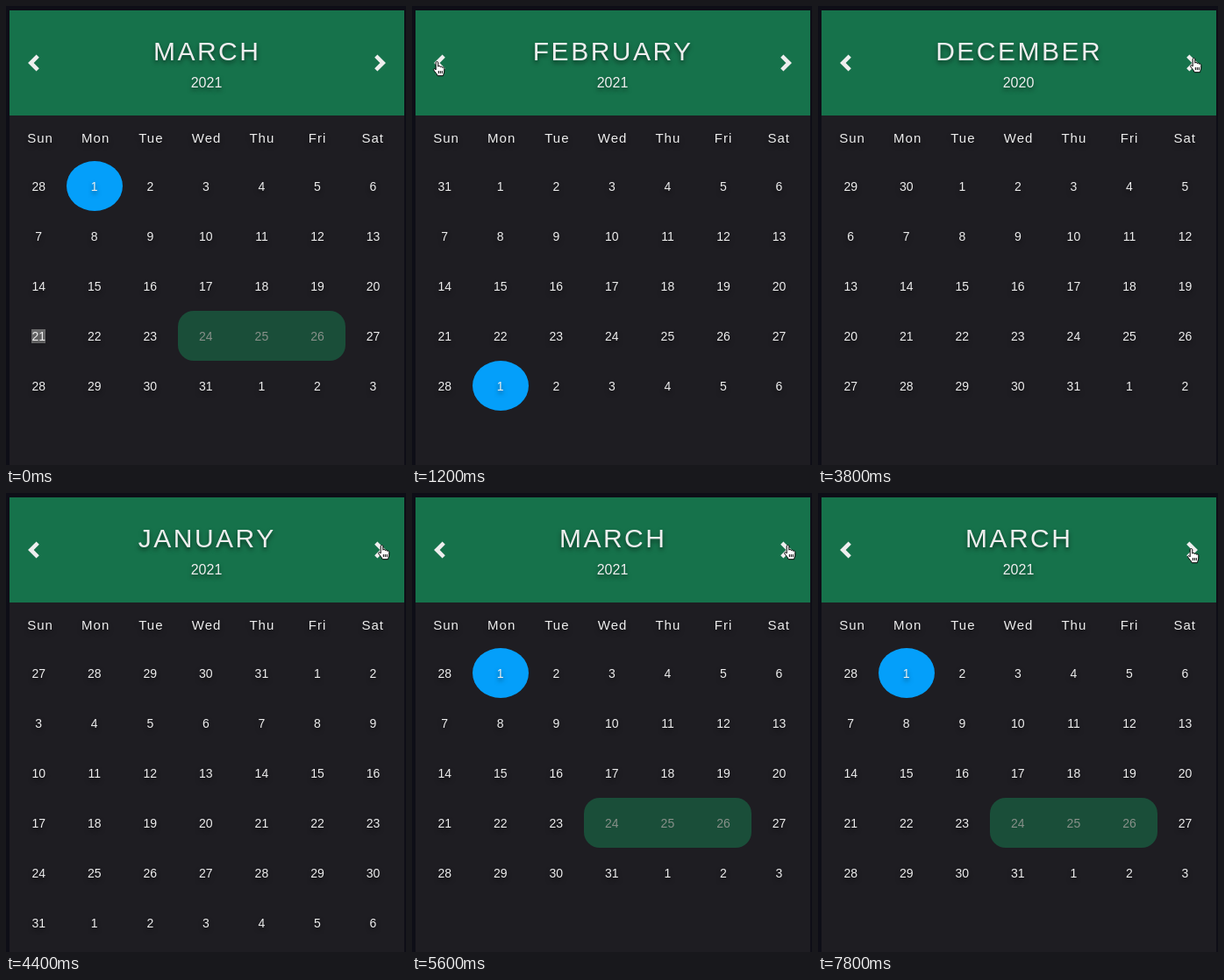
Animation of 456x524 px, one loop 8 s. Source, as an HTML page with a canvas:

```html
<!DOCTYPE html>
<html lang="en">
<head>
<meta charset="utf-8">
<title>Calendar</title>
<style>
  html, body { margin: 0; width: 100%; height: 100%; overflow: hidden; background: #0e0e17; }
  canvas { display: block; }
</style>
</head>
<body>
<canvas id="stage" width="456" height="524"></canvas>
<script>
const ctx = document.getElementById('stage').getContext('2d');
const LOOP = 8000, STEP = 200;
const FONT = '"Liberation Sans", Arial, sans-serif';
const WEEKDAYS = ['Sun', 'Mon', 'Tue', 'Wed', 'Thu', 'Fri', 'Sat'];
const MONTHS = ['January', 'February', 'March', 'April', 'May', 'June', 'July',
  'August', 'September', 'October', 'November', 'December'];

// [time, month offset from January 2021]
const PAGES = [[0, 2], [1200, 1], [1800, 0], [2400, -1], [4000, 0], [4600, 1], [5600, 2]];

// Each visit of the pointer: [time, x, y]
const VISITS = [
  [[200, 150, 150], [800, 24, 63], [2400, 24, 63], [3400, 404, 66],
   [3600, 435, 60], [3800, 424, 59], [5600, 424, 59], [5800, 443, 74]],
  [[7200, 400, 17], [7800, 421, 63], [8000, 421, 63]]
];

const HAND = new Path2D('M3.2 1.8C3.2.1 5.8.1 5.8 1.8V6.2C6.2 5 8.2 5.2 8.3 6.6C8.9 5.7 10.5 6 10.6 7.3' +
  'C11.3 6.6 12.8 7.1 12.8 8.5V11C12.8 14 11.5 14.8 11.5 16.7H5.2C4.6 14.3 1.8 12.4.8 10.2C.1 8.5 2 8 3.2 9.8Z');
const CREASES = new Path2D('M6.3 11V14M8.3 11V14M10.3 11V14');
const ARROW = new Path2D('M1 1V14L4 11.2L6 16L8.3 15L6.3 10.4H10.4Z');

function text(str, x, y, size, { spacing = 0, color = '#eee', shadow = true } = {}) {
  ctx.save();
  ctx.font = `${size}px ${FONT}`;
  ctx.letterSpacing = spacing + 'px';
  ctx.textAlign = 'center';
  ctx.fillStyle = color;
  if (shadow) {
    ctx.shadowColor = 'rgba(0,0,0,.5)';
    ctx.shadowOffsetY = 3;
    ctx.shadowBlur = 5;
  }
  ctx.fillText(str, x, y);
  ctx.restore();
}

function rect(x, y, w, h, color, radius = 0) {
  ctx.fillStyle = color;
  ctx.beginPath();
  ctx.roundRect(x, y, w, h, radius);
  ctx.fill();
}

function chevron(tip, end) {
  ctx.strokeStyle = '#eee';
  ctx.lineWidth = 4.6;
  ctx.beginPath();
  ctx.moveTo(end, 57.1);
  ctx.lineTo(tip, 65);
  ctx.lineTo(end, 72.9);
  ctx.stroke();
}

function drawHeader(date, sunSelected) {
  rect(4, 5, 450, 120, '#16724b');
  chevron(28.3, 36.2);
  chevron(429.7, 421.8);
  text(MONTHS[date.getMonth()].toUpperCase(), 229.2, 62, 30, { spacing: 2.5 });
  text(date.getFullYear(), 228.5, 93, 16);
  if (sunSelected) rect(24, 142, 30, 17, '#496f96');
  WEEKDAYS.forEach((day, i) => text(day, 39 + 63.2 * i, 156, 15, { spacing: 1 }));
}

function drawDays(first, daySelected) {
  const year = first.getFullYear(), month = first.getMonth(), lead = first.getDay();
  const length = new Date(year, month + 1, 0).getDate();
  const cells = Math.ceil((lead + length) / 7) * 7;
  for (let i = 0; i < cells; i++) {
    const date = new Date(year, month, 1 - lead + i);
    const day = date.getDate(), inMarch = date.getMonth() === 2;
    const x = 37.2 + 63.55 * (i % 7), y = 206 + 57 * Math.floor(i / 7);
    const booked = inMarch && day >= 24 && day <= 26;
    if (inMarch && day === 1) {
      ctx.fillStyle = '#049ffa';
      ctx.beginPath();
      ctx.ellipse(101, y - .5, 32, 28.5, 0, 0, 2 * Math.PI);
      ctx.fill();
    }
    if (inMarch && day === 24) rect(196, y - 29, 191, 57, '#1a4e39', 18);
    if (daySelected && day === 21) rect(29, y - 8, 16, 16, '#6c6c6d');
    text(day, x, y + 5, 14, { color: booked ? '#879089' : '#eee', shadow: !booked });
  }
}

function pointerAt(t) {
  for (const visit of VISITS) {
    for (let i = 1; i < visit.length; i++) {
      const [t0, x0, y0] = visit[i - 1], [t1, x1, y1] = visit[i];
      if (t < t0 || t > t1) continue;
      const p = (t - t0) / (t1 - t0), e = p * p * (3 - 2 * p);
      return [x0 + (x1 - x0) * e, y0 + (y1 - y0) * e];
    }
  }
  return null;
}

function drawPointer([x, y]) {
  const overButton = y > 48 && y < 76 && (x < 36 || (x > 412 && x < 432));
  ctx.save();
  ctx.translate(x, y);
  ctx.lineWidth = 1;
  ctx.lineJoin = 'round';
  ctx.fillStyle = overButton ? '#fff' : '#000';
  ctx.strokeStyle = overButton ? '#000' : '#fff';
  const shape = overButton ? HAND : ARROW;
  ctx.fill(shape);
  ctx.stroke(shape);
  if (overButton) ctx.stroke(CREASES);
  ctx.restore();
}

function draw(now) {
  const t = Math.floor(now % LOOP / STEP) * STEP;
  const offset = PAGES.findLast(([start]) => start <= t)[1];
  const first = new Date(2021, offset, 1);
  rect(0, 0, 456, 524, '#0e0e17');
  rect(4, 5, 450, 519, '#1e1d22');
  drawHeader(first, t >= 4600 && t < 5600);
  drawDays(first, t < 1200);
  const pointer = pointerAt(t);
  if (pointer) drawPointer(pointer);
}

const start = performance.now();
function tick() {
  draw(performance.now() - start);
  requestAnimationFrame(tick);
}
tick();
</script>
</body>
</html>
```
